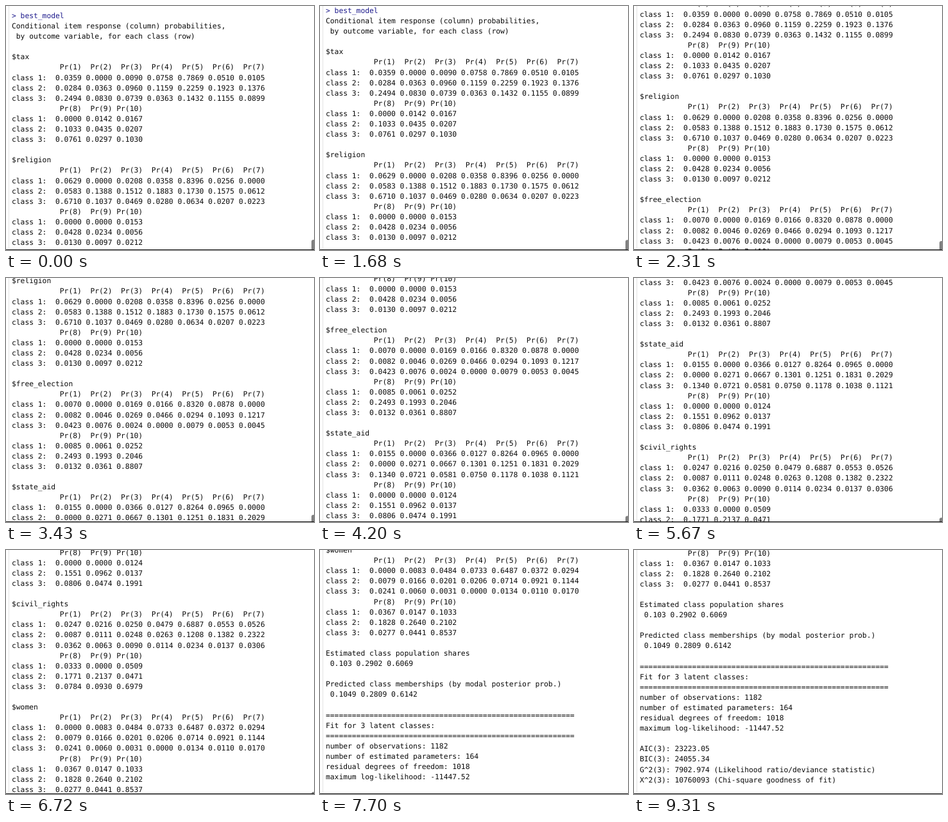
These frames come from a looping animation (480x381 px, 9450 ms). An HTML page:

```html
<!DOCTYPE html>
<html lang="en">
<head>
<meta charset="utf-8">
<title>Console output</title>
<style>
  html, body { margin: 0; width: 100%; height: 100%; overflow: hidden; background: #fff; }
  #stage { position: relative; width: 480px; height: 381px; overflow: hidden; background: #fff; }
  #view { position: absolute; inset: 0 0 1px 0; overflow: hidden; }
  #log {
    position: absolute; left: 9px; top: 8px; margin: 0;
    font: 11.3px/16.1px "DejaVu Sans Mono", monospace;
    text-rendering: geometricPrecision;
    font-variant-ligatures: none;
    color: #0a0a0a; white-space: pre;
  }
  #log b { font-weight: normal; color: #1d1a8c; }
  #edge { position: absolute; left: 4px; top: 0; width: 1px; height: 380px; background: #e2e2e2; }
  #base { position: absolute; left: 0; top: 380px; width: 480px; height: 1px; background: #1c1c1c; }
  #thumb {
    position: absolute; left: 476px; top: 365px; width: 5px; height: 40px;
    border-radius: 3px 0 0 3px; background: #808080;
  }
</style>
</head>
<body>
<div id="stage">
<div id="view">
<pre id="log"><b>&gt; best_model</b>
Conditional item response (column) probabilities,
 by outcome variable, for each class (row)

$tax
           Pr(1)  Pr(2)  Pr(3)  Pr(4)  Pr(5)  Pr(6)  Pr(7)
class 1:  0.0359 0.0000 0.0090 0.0758 0.7869 0.0510 0.0105
class 2:  0.0284 0.0363 0.0960 0.1159 0.2259 0.1923 0.1376
class 3:  0.2494 0.0830 0.0739 0.0363 0.1432 0.1155 0.0899
           Pr(8)  Pr(9) Pr(10)
class 1:  0.0000 0.0142 0.0167
class 2:  0.1033 0.0435 0.0207
class 3:  0.0761 0.0297 0.1030

$religion
           Pr(1)  Pr(2)  Pr(3)  Pr(4)  Pr(5)  Pr(6)  Pr(7)
class 1:  0.0629 0.0000 0.0208 0.0358 0.8396 0.0256 0.0000
class 2:  0.0583 0.1388 0.1512 0.1883 0.1730 0.1575 0.0612
class 3:  0.6710 0.1037 0.0469 0.0280 0.0634 0.0207 0.0223
           Pr(8)  Pr(9) Pr(10)
class 1:  0.0000 0.0000 0.0153
class 2:  0.0428 0.0234 0.0056
class 3:  0.0130 0.0097 0.0212

$free_election
           Pr(1)  Pr(2)  Pr(3)  Pr(4)  Pr(5)  Pr(6)  Pr(7)
class 1:  0.0070 0.0000 0.0169 0.0166 0.8320 0.0878 0.0000
class 2:  0.0082 0.0046 0.0269 0.0466 0.0294 0.1093 0.1217
class 3:  0.0423 0.0076 0.0024 0.0000 0.0079 0.0053 0.0045
           Pr(8)  Pr(9) Pr(10)
class 1:  0.0085 0.0061 0.0252
class 2:  0.2493 0.1993 0.2046
class 3:  0.0132 0.0361 0.8807

$state_aid
           Pr(1)  Pr(2)  Pr(3)  Pr(4)  Pr(5)  Pr(6)  Pr(7)
class 1:  0.0155 0.0000 0.0366 0.0127 0.8264 0.0965 0.0000
class 2:  0.0000 0.0271 0.0667 0.1301 0.1251 0.1831 0.2029
class 3:  0.1340 0.0721 0.0581 0.0750 0.1178 0.1038 0.1121
           Pr(8)  Pr(9) Pr(10)
class 1:  0.0000 0.0000 0.0124
class 2:  0.1551 0.0962 0.0137
class 3:  0.0806 0.0474 0.1991

$civil_rights
           Pr(1)  Pr(2)  Pr(3)  Pr(4)  Pr(5)  Pr(6)  Pr(7)
class 1:  0.0247 0.0216 0.0250 0.0479 0.6887 0.0553 0.0526
class 2:  0.0087 0.0111 0.0248 0.0263 0.1208 0.1382 0.2322
class 3:  0.0362 0.0063 0.0090 0.0114 0.0234 0.0137 0.0306
           Pr(8)  Pr(9) Pr(10)
class 1:  0.0333 0.0000 0.0509
class 2:  0.1771 0.2137 0.0471
class 3:  0.0784 0.0930 0.6979

$women
           Pr(1)  Pr(2)  Pr(3)  Pr(4)  Pr(5)  Pr(6)  Pr(7)
class 1:  0.0000 0.0083 0.0484 0.0733 0.6487 0.0372 0.0294
class 2:  0.0079 0.0166 0.0201 0.0206 0.0714 0.0921 0.1144
class 3:  0.0241 0.0060 0.0031 0.0000 0.0134 0.0110 0.0170
           Pr(8)  Pr(9) Pr(10)
class 1:  0.0367 0.0147 0.1033
class 2:  0.1828 0.2640 0.2102
class 3:  0.0277 0.0441 0.8537

Estimated class population shares
 0.103 0.2902 0.6069

Predicted class memberships (by modal posterior prob.)
 0.1049 0.2809 0.6142

=========================================================
Fit for 3 latent classes:
=========================================================
number of observations: 1182
number of estimated parameters: 164
residual degrees of freedom: 1018
maximum log-likelihood: -11447.52

AIC(3): 23223.05
BIC(3): 24055.34
G^2(3): 7902.974 (Likelihood ratio/deviance statistic)
X^2(3): 10760093 (Chi-square goodness of fit)
</pre>
<div id="thumb"></div>
</div>
<div id="edge"></div>
<div id="base"></div>
</div>
<script>
  const LOOP = 9450, TICK = 70;
  const log = document.getElementById('log');
  const thumb = document.getElementById('thumb');

  // Trackpad swipes: start ms, end ms, scroll position reached
  const swipes = [
    [1610, 2140, 87.3],
    [2170, 3180, 214.5],
    [3220, 4200, 320.5],
    [4690, 5840, 460.6],
    [5880, 6895, 641.8],
    [6930, 8330, 960.5]
  ];

  // Quick push followed by a long glide
  const glide = u => 1 - (1 - u) ** 3 * (1 + 3 * u);

  function scrollAt(t) {
    let pos = 0;
    for (const [start, end, goal] of swipes) {
      if (t <= start) break;
      pos += (goal - pos) * glide(Math.min(1, (t - start) / (end - start)));
    }
    return pos;
  }

  const moveY = (el, y) => { el.style.transform = `translateY(${y.toFixed(2)}px)`; };

  const origin = performance.now();
  function draw() {
    const t = (performance.now() - origin) % LOOP;
    const pos = scrollAt(Math.floor(t / TICK) * TICK);
    moveY(log, -pos);
    moveY(thumb, pos * 0.02);
    requestAnimationFrame(draw);
  }
  draw();
</script>
</body>
</html>
```
